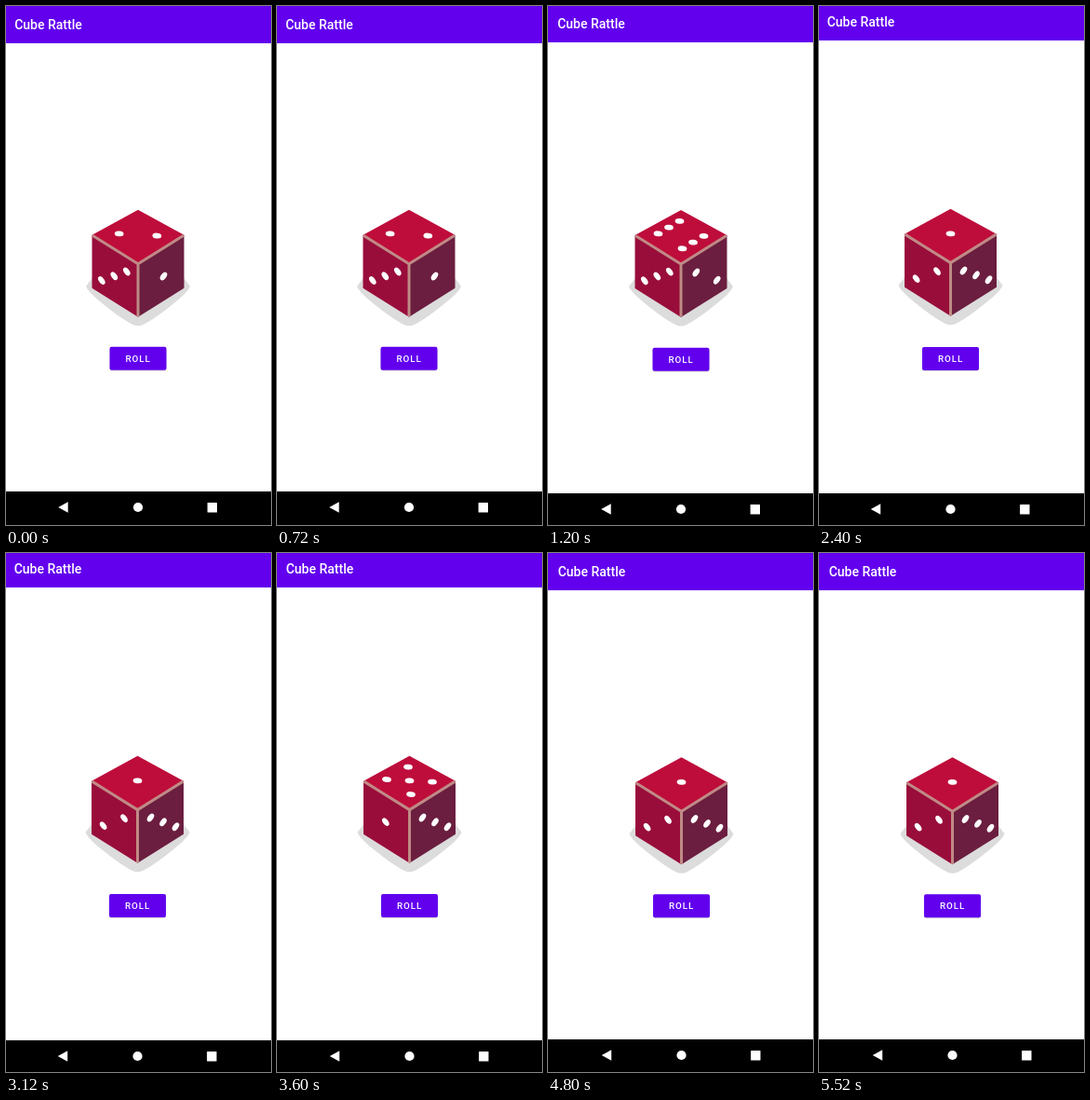
An HTML page that plays this animation: 285x557 px, repeating every 6 s.

```html
<!DOCTYPE html>
<html lang="en">
<head>
<meta charset="utf-8">
<title>Cube Rattle</title>
<style>
  html, body { margin: 0; width: 100%; height: 100%; overflow: hidden; background: #fff; }
  svg { display: block; width: 100%; height: 100%; }
  text { font-family: Roboto, "Noto Sans", sans-serif; font-weight: 500; fill: #fff; }
</style>
</head>
<body>
<svg viewBox="0 0 285 557">
  <rect id="bar" width="285" fill="#6200ee"/>
  <text id="title" font-size="14">Cube Rattle</text>

  <g id="die">
    <path fill="#dcdcdc" d="M-49 73L-56 82Q-55 86 -45 95Q-20 116 -6 123Q0 126 6 123Q20 116 45 95Q55 86 56 82L49 73Z"/>
    <path fill="#be0d3b" d="M0 0L49.5 27L0 59L-49.5 27Z"/>
    <path fill="#990d3b" d="M-49.5 27L0 58V115L-49.5 84Z"/>
    <path fill="#6b1e3f" d="M49.5 27L0 58V115L49.5 84Z"/>
    <path fill="none" stroke="#c08a86" stroke-width="3" d="M-49 27.5L0 58L49 27.5M0 58V114.5"/>
    <g id="pips" fill="#fff"></g>
  </g>

  <g id="button">
    <rect x="-30.5" y="1" width="61" height="25" rx="2.5" opacity=".15"/>
    <rect x="-30.5" width="61" height="25" rx="2" fill="#6200ee"/>
    <text x="-13.5" y="16" font-size="9.8" letter-spacing=".9">ROLL</text>
  </g>

  <g id="nav">
    <rect x="-200" width="400" height="60"/>
    <path fill="#fff" d="M-85.8 17L-75.3 11.3V22.7Z"/>
    <circle cy="17" r="5.1" fill="#fff"/>
    <rect x="74.6" y="12" width="10.4" height="10.4" rx=".5" fill="#fff"/>
  </g>
</svg>
<script>
const HOLD = 1200;
const $ = id => document.getElementById(id);

// Each face: its centre, the pip steps u and v along its edges, and the pip tilt.
const TOP = { centre: [0, 26.7], u: [13, 8], v: [11.5, -6.7], tilt: 5 };
const LEFT = { centre: [-25.7, 71], u: [13.5, 8.5], v: [0, -13.3], tilt: 54 };
const RIGHT = { centre: [27.5, 71.2], u: [13.5, -8.5], v: [0, 13.4], tilt: -54 };

// Faces shown (top, left, right), the screen's middle, and the edges of its two bars.
const rolls = [
  { faces: [2, 3, 1], x: 142, bar: 40, nav: 521 },
  { faces: [6, 3, 2], x: 143, bar: 39, nav: 523 },
  { faces: [1, 2, 3], x: 141.5, bar: 37, nav: 523 },
  { faces: [5, 1, 3], x: 142.5, bar: 37, nav: 523 },
  { faces: [1, 2, 3], x: 143.5, bar: 40, nav: 522 }
];

// Pip places for a value, in steps from the face's centre.
function layout(value) {
  const corner = value === 2 ? 0.83 : 1;
  const pair = (a, b) => [[a, b], [-a, -b]];
  return [
    ...(value % 2 ? [[0, 0]] : []),
    ...(value > 1 ? pair(corner, corner) : []),
    ...(value > 3 ? pair(1, -1) : []),
    ...(value === 6 ? pair(1, 0) : [])
  ];
}

function drawFace({ centre, u, v, tilt }, value) {
  return layout(value).map(([a, b]) => {
    const [x, y] = centre.map((c, i) => c + a * u[i] + b * v[i]);
    return `<ellipse rx="4.9" ry="2.9" transform="translate(${x} ${y}) rotate(${tilt})"/>`;
  }).join('');
}

const move = (id, x, y) => $(id).setAttribute('transform', `translate(${x} ${y})`);

function show({ faces, x, bar, nav }) {
  const between = part => bar + part * (nav - bar);
  $('bar').setAttribute('height', bar);
  move('title', x - 132.8, bar - 14.9);
  move('die', x, between(0.3717));
  move('button', x, between(0.677));
  move('nav', x, nav);
  $('pips').innerHTML = [TOP, LEFT, RIGHT].map((face, i) => drawFace(face, faces[i])).join('');
}

let current = -1;
const start = performance.now();
function tick() {
  const index = Math.floor((performance.now() - start) / HOLD) % rolls.length;
  if (index !== current) show(rolls[current = index]);
  requestAnimationFrame(tick);
}
tick();
</script>
</body>
</html>
```
